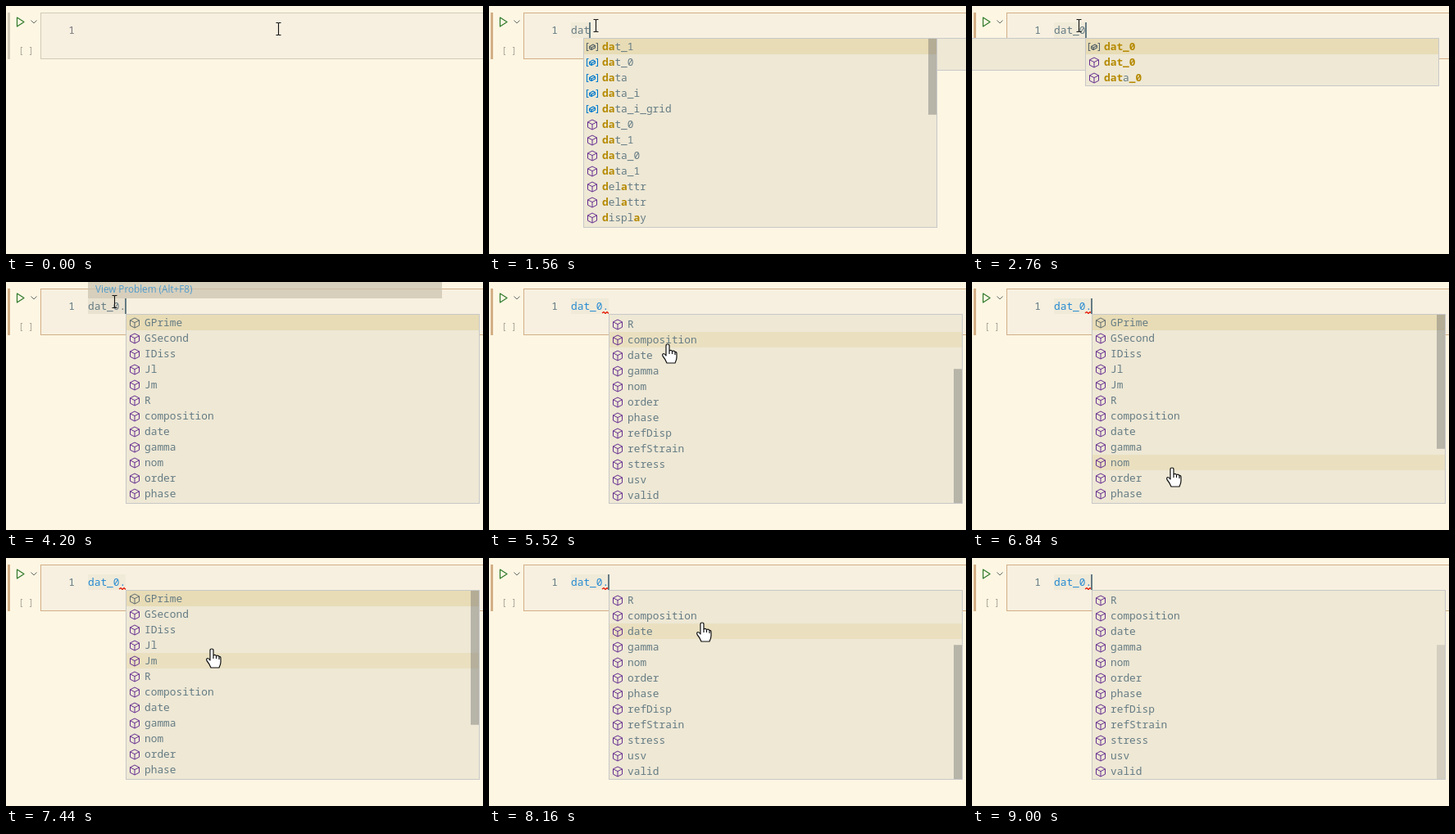
These frames come from a looping animation (582 by 303 pixels, 9.24 s). An HTML page with a canvas:

```html
<!DOCTYPE html>
<html lang="en">
<head>
<meta charset="utf-8">
<title>Notebook completion</title>
<style>
  html, body { margin: 0; width: 100%; height: 100%; overflow: hidden; background: #fdf6e3; }
  canvas { display: block; }
</style>
</head>
<body>
<canvas id="stage" width="582" height="303"></canvas>
<script>
const ctx = document.getElementById('stage').getContext('2d');
const LOOP = 9240, STEP = 120, ROW = 19, LIST_TOP = 40, LIST_MAX = 230, MAX_SCROLL = 93;
const MONO = '"Noto Sans Mono", "DejaVu Sans Mono", monospace';
const SIZE = 12.83, ADVANCE = 7.7, TEXT_X = 100;
const GREY = '#657b83', BLUE = '#268bd2', FOCUS = '#d3af86', WIDGET = '#eee8d5';

const variables = ['dat_1', 'dat_0', 'data', 'data_i', 'data_i_grid'];
const names = ['dat_0', 'dat_1', 'data_0', 'data_1', 'delattr', 'delattr', 'display'];
const symbols = [
  ...variables.map(label => ({ label, variable: true })),
  ...names.map(label => ({ label }))
];
const members = ('GPrime GSecond IDiss Jl Jm R composition date gamma nom order phase ' +
  'refDisp refStrain stress usv valid').split(' ').map(label => ({ label }));

const keys = [[1080, 'd'], [1200, 'a'], [1560, 't'], [2400, '_'], [2520, '0'], [3000, '.']];
// time, x, y of the pointer
const pointerPath = [
  [0, 333, 28], [720, 131, 24], [3720, 131, 24], [3960, 133, 24], [4320, 133, 24],
  [4680, 155, 58], [5040, 200, 72], [5400, 214, 74], [5520, 218, 76], [6000, 237, 203],
  [6120, 239, 209], [6360, 244, 227], [7080, 244, 227], [7200, 247, 190], [7320, 249, 128],
  [7440, 251, 111], [7680, 254, 98], [8040, 258, 88], [8520, 266, 52]
];
const scrollPath = [[5040, 0], [5400, 1], [6480, 1], [6600, .5], [6720, .5], [6840, 0], [7680, 0], [8040, 1]];

function along(path, t) {
  const i = path.findIndex(p => p[0] > t);
  if (i === 0) return path[0].slice(1);
  if (i < 0) return path[path.length - 1].slice(1);
  const a = path[i - 1], b = path[i], k = (t - a[0]) / (b[0] - a[0]);
  return a.slice(1).map((v, j) => v + (b[j + 1] - v) * k);
}

function box(x, y, w, h, color) {
  ctx.fillStyle = color;
  ctx.fillRect(x, y, w, h);
}

function text(s, x, y, color, font = `${SIZE}px ${MONO}`) {
  ctx.font = font;
  ctx.fillStyle = color;
  ctx.fillText(s, x, y);
}

function shape(x, y, d, stroke, width = 1, fill) {
  ctx.save();
  ctx.translate(x, y);
  const path = new Path2D(d);
  if (fill) { ctx.fillStyle = fill; ctx.fill(path); }
  ctx.strokeStyle = stroke;
  ctx.lineWidth = width;
  ctx.lineJoin = 'round';
  ctx.stroke(path);
  ctx.restore();
}

function drawIcon(x, y, variable, selected) {
  if (variable) {
    shape(x, y, 'M-4.5-4.5H-6.5V4.5H-4.5M4.5-4.5H6.5V4.5H4.5M-3.5-.5L1-3L3.5-1.5V1L-1 3.5L-3.5 2ZM-3.5-.5L-1 1L3.5-1.5M-1 1V3.5',
      selected ? '#566368' : '#007acc', 1.1);
  } else {
    shape(x, y, 'M0-6L5.5-3.2V3.2L0 6L-5.5 3.2V-3.2ZM-5.5-3.2L0-.4L5.5-3.2M0-.4V6',
      selected ? '#5f6b6e' : '#652d90', 1);
  }
}

function isMatch(label, filter) {
  let n = 0;
  for (const c of label) if (c === filter[n]) n++;
  return n === filter.length;
}

function drawLabel(label, x, y, filter) {
  let n = 0;
  [...label].forEach((c, i) => {
    const hit = c === filter[n];
    if (hit) n++;
    text(c, x + i * ADVANCE, y, hit ? '#b58900' : GREY, `${hit ? 'bold ' : ''}${SIZE}px ${MONO}`);
  });
}

function panel(x, y, w, h) {
  box(x, y, w, h, WIDGET);
  ctx.strokeStyle = '#c8c8c8';
  ctx.lineWidth = 1;
  ctx.strokeRect(x + .5, y + .5, w - 1, h - 1);
}

function drawList({ x, items, filter = '', scroll = 0, hover = -1, thumb = 0, total = items.length }) {
  const h = Math.min(LIST_MAX, total * ROW), w = 430;
  panel(x, LIST_TOP - 1, w + 2, h + 2);
  ctx.save();
  ctx.beginPath();
  ctx.rect(x + 1, LIST_TOP, w, h);
  ctx.clip();
  items.forEach((item, i) => {
    const y = LIST_TOP + i * ROW - scroll;
    if (i === 0) box(x + 1, y, w, ROW, '#e8dcb6');
    else if (i === hover) box(x + 1, y, w, ROW, '#eae0c0');
    drawIcon(x + 11, y + 10, item.variable, i === 0);
    drawLabel(item.label, x + 23, y + 14, filter);
  });
  if (thumb) {
    const ratio = h / (total * ROW);
    box(x + w - 9, LIST_TOP + scroll * ratio, 10, h * ratio, `rgba(100,100,100,${.4 * thumb})`);
  }
  ctx.restore();
}

function drawCell(focused) {
  const edge = focused ? FOCUS : '#d1cbb8';
  box(0, 0, 582, 303, '#fdf6e3');
  box(2, 8, 3, 57, edge);
  box(42, 8, 540, 57, edge);
  box(43, 9, 539, 55, '#f7f0e0');
  shape(13.5, 14, 'M0 0L8.5 5.5L0 11Z', '#2f7a2b', 1.2);
  shape(30.5, 17.5, 'M0 0L3.5 3.5L7 0', '#6a6a62', 1);
  text('[ ]', 15.5, 58, '#a39d90', `10px ${MONO}`);
  text('1', 76.3, 34, focused ? GREY : '#7b7780');
}

function drawCode(t) {
  const code = keys.filter(k => k[0] <= t).map(k => k[1]).join('');
  const end = TEXT_X + code.length * ADVANCE;
  const resolved = t >= 5160;
  if (code) box(TEXT_X, 20, end - TEXT_X, 19, t >= 4200 && t < 4680 ? '#e9e2d1' : '#f0ead9');
  [...code].forEach((c, i) => text(c, TEXT_X + i * ADVANCE, 34, resolved ? BLUE : GREY));
  if (resolved) shape(138, 36, 'M0 2L2 .5L4 2.5L6 .5L8 2.5', '#e51400', 1.1);
  const last = Math.max(960, ...keys.map(k => k[0]).filter(k => k <= t));
  if (t >= 960 && Math.floor((t - last) / 480) % 2 === 0) box(Math.floor(end - .5), 20, 2, 19, '#657b83');
}

function drawSuggestions(t, scroll, hover) {
  if (t >= 1320 && t < 2520) {
    if (t < 2400) {
      panel(546, 39, 60, 40);
      const thumb = t < 2040 ? 1 : t < 2160 ? .5 : 0;
      drawList({ x: 115, items: symbols, filter: 'da', thumb, total: 30 });
    } else {
      drawList({ x: 115, items: symbols.filter(s => isMatch(s.label, 'dat_')), filter: 'dat_' });
    }
  } else if (t >= 2520 && t < 3000) {
    if (t >= 2760) panel(-10, 39, 149, 40);
    drawList({ x: 138, items: symbols.filter(s => isMatch(s.label, 'dat_0')), filter: 'dat_0' });
  } else if (t >= 4200) {
    const thumb = t < 4680 ? 0 : t < 9000 ? 1 : .5;
    drawList({ x: 146, items: members, scroll, hover, thumb });
  }
}

function drawTooltip(t) {
  if (t < 4200 || t >= 4680) return;
  ctx.globalAlpha = t === 4200 ? .75 : t === 4560 ? .5 : 1;
  box(100, 0, 432, 20, '#ccc4b0');
  text('View Problem (Alt+F8)', 109, 13, BLUE, '11.7px "Open Sans", sans-serif');
  ctx.globalAlpha = 1;
}

function drawPointer(x, y, hand) {
  if (hand) {
    shape(x, y, 'M-2 2Q-2 0 0 0Q2 0 2 2V8Q4 6.5 5.5 8.5Q8 7.5 9 9.5Q11 9 11 11.5V16Q11 19 9 23H-1Q-3 18-6 14.5Q-7 12-5 11.5Q-3.5 11.5-2 14Z' +
      'M2 8V12M5.5 8.5V12M9 9.5V13', '#111', 1.2, '#fff');
  } else {
    shape(Math.round(x) - .5, Math.round(y), 'M-3-7.5H-1L0-7L1-7.5H3M0-7V7M-3 7.5H-1L0 7L1 7.5H3', '#111', 1.1);
  }
}

function draw(now) {
  const t = Math.floor(now % LOOP / STEP) * STEP;
  const [x, y] = along(pointerPath, t);
  const scroll = along(scrollPath, t)[0] * MAX_SCROLL;
  const inList = t > 4320 && y >= LIST_TOP;
  const visible = t < 8640;
  // hover trails the pointer by one step
  const trailY = along(pointerPath, t - STEP)[1];
  const hover = inList && visible ? Math.floor((trailY - LIST_TOP + scroll) / ROW) : -1;

  drawCell(t >= 840);
  drawCode(t);
  drawSuggestions(t, scroll, hover);
  drawTooltip(t);
  if (visible) drawPointer(x, y, inList);
  requestAnimationFrame(draw);
}
requestAnimationFrame(draw);
</script>
</body>
</html>
```
